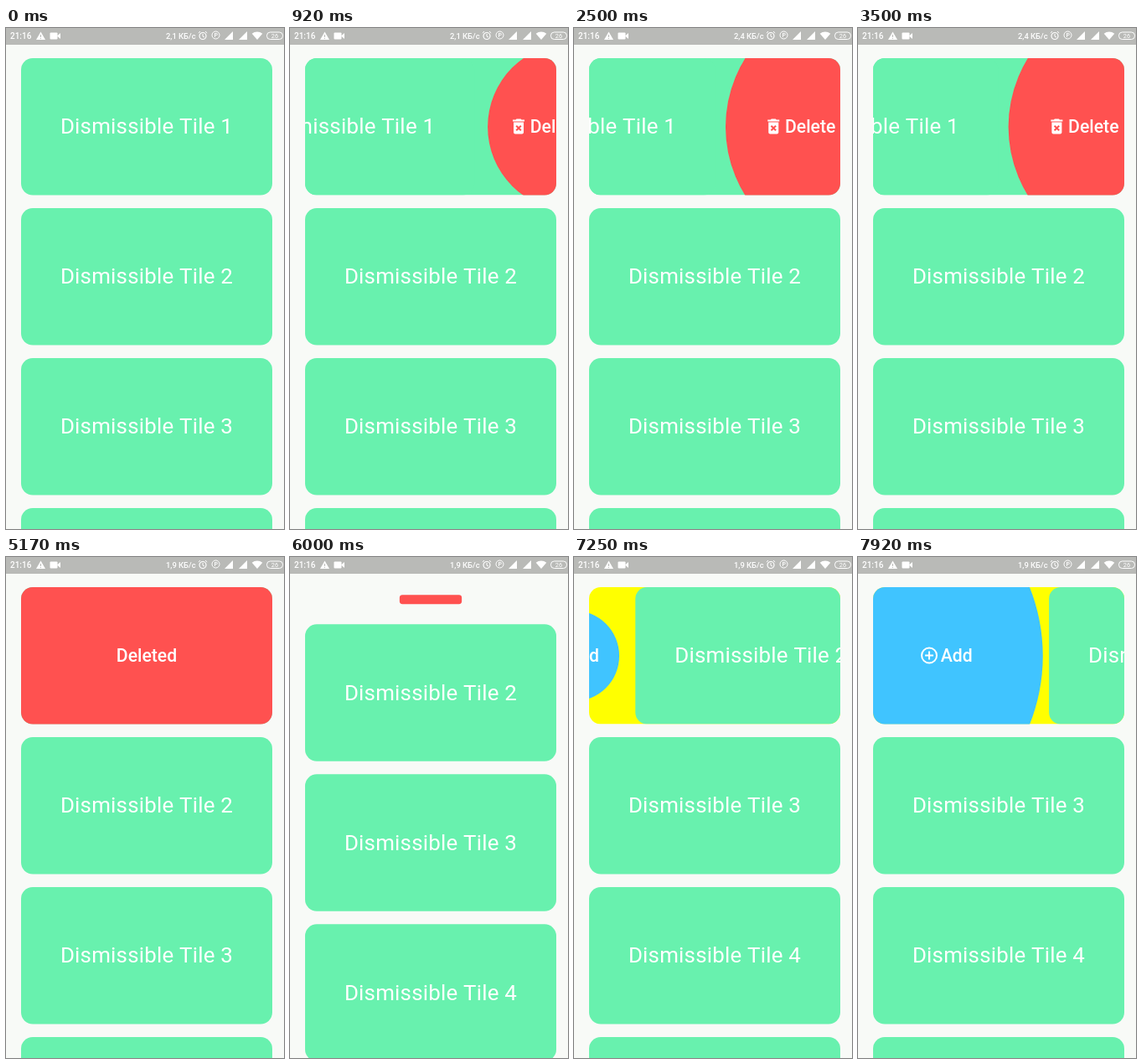
These frames come from a looping animation (332 px wide and 598 px high, 8 s). An HTML page with a canvas:

```html
<!DOCTYPE html>
<html lang="en">
<head>
<meta charset="utf-8">
<title>Dismissible tiles</title>
<style>
  html, body { margin: 0; width: 100%; height: 100%; overflow: hidden; background: #f8faf7; }
  canvas { display: block; }
</style>
</head>
<body>
<canvas id="stage" width="332" height="598"></canvas>
<script>
const ctx = document.getElementById('stage').getContext('2d');
const LOOP = 8000;
const GREEN = '#68f1ae', RED = '#ff5150', BLUE = '#40c4ff', YELLOW = '#ffff00';
const CARD = { x: 18, y: 36, w: 300, h: 163.5, r: 14, pitch: 179 };

// [time, distance] points of the two drags
const dragLeft = [[590, 0], [850, 78], [1100, 148], [1350, 188], [1580, 195], [2250, 177],
  [2600, 138], [2920, 118], [3250, 118], [3500, 150], [3750, 230], [4040, 300]];
const dragRight = [[7090, 0], [7250, 55], [7500, 128], [7750, 188], [7920, 210], [8000, 217]];

const trash = new Path2D('M6 19c0 1.1.9 2 2 2h8c1.1 0 2-.9 2-2V7H6v12zm2.46-7.12l1.41-1.41L12 12.59' +
  'l2.12-2.12 1.41 1.41L13.41 14l2.12 2.12-1.41 1.41L12 15.41l-2.12 2.12-1.41-1.41L10.59 14z' +
  'M15.5 4l-1-1h-5l-1 1H5v2h14V4z');
const plus = new Path2D('M13 7h-2v4H7v2h4v4h2v-4h4v-2h-4zM12 2a10 10 0 1 0 0 20a10 10 0 1 0 0-20z' +
  'm0 18a8 8 0 1 1 0-16a8 8 0 1 1 0 16z');

const clamp = v => Math.max(0, Math.min(1, v));
const progress = (t, start, length) => clamp((t - start) / length);

function follow(points, t) {
  if (t <= points[0][0]) return points[0][1];
  for (let i = 1; i < points.length; i++) {
    const [t0, v0] = points[i - 1], [t1, v1] = points[i];
    if (t <= t1) return v0 + (v1 - v0) * (t - t0) / (t1 - t0);
  }
  return points[points.length - 1][1];
}

function text(str, x, y, size, { weight = 400, align = 'left', color = '#fff', spacing = 0 } = {}) {
  ctx.font = `${weight} ${size}px Roboto, sans-serif`;
  ctx.letterSpacing = spacing + 'px';
  ctx.textAlign = align;
  ctx.fillStyle = color;
  ctx.fillText(str, x, y);
}

function roundRect(x, y, w, h, r, color) {
  ctx.beginPath();
  ctx.roundRect(x, y, w, h, r);
  ctx.fillStyle = color;
  ctx.fill();
}

function disc(x, y, r, color) {
  ctx.beginPath();
  ctx.arc(x, y, r, 0, 7);
  ctx.fillStyle = color;
  ctx.fill();
}

function polygon(...p) {
  ctx.beginPath();
  for (let i = 0; i < p.length; i += 2) ctx.lineTo(p[i], p[i + 1]);
  ctx.closePath();
  ctx.fill();
}

function line(draw, width = 1) {
  ctx.beginPath();
  draw();
  ctx.lineWidth = width;
  ctx.stroke();
}

function tile(n, y, dx = 0) {
  roundRect(CARD.x + dx, y, CARD.w, CARD.h, CARD.r, GREEN);
  text('Dismissible Tile ' + n, 168 + dx, y + 90.4, 25.9, { align: 'center', spacing: 0.21 });
}

function label(icon, word, x, y) {
  ctx.save();
  ctx.translate(x, y + 69.5);
  ctx.fillStyle = '#fff';
  ctx.fill(icon, 'evenodd');
  ctx.restore();
  text(word, x + 25.7, y + 88.6, 21.2, { weight: 500 });
}

// A tile dragged sideways over its action; a disc grows from the uncovered edge.
function swipe(n, y, dx, t) {
  const right = dx > 0, d = Math.abs(dx);
  ctx.save();
  ctx.beginPath();
  ctx.roundRect(CARD.x, y, CARD.w, CARD.h, CARD.r);
  ctx.clip();
  ctx.fillStyle = right ? YELLOW : GREEN;
  ctx.fillRect(CARD.x, y, CARD.w, CARD.h);
  const radius = Math.max(0, 1.077 * d - 5.5 + Math.max(0, d - 285));
  disc(right ? 0 : 336, y + 82, radius, right ? BLUE : RED);
  if (right) {
    label(plus, 'Add', 73 + 0.69 * (d - 210), y);
  } else {
    const done = progress(t, 4330, 500);
    ctx.globalAlpha = 1 - done;
    label(trash, 'Delete', 195 + 0.68 * (195 - d), y);
    ctx.globalAlpha = done;
    text('Deleted', 168, y + 88.6, 21.2, { weight: 500, align: 'center' });
    ctx.globalAlpha = 1;
  }
  tile(n, y, dx);
  ctx.restore();
}

function collapse(s) {
  const h = Math.min(CARD.h, CARD.pitch * s);
  ctx.save();
  ctx.translate(168, 28.5 + CARD.pitch * s / 2);
  ctx.scale(s, s);
  roundRect(-CARD.w / 2, -h / 2, CARD.w, h, CARD.r, RED);
  ctx.globalAlpha = clamp(s * 2 - 1);
  text('Deleted', 0, 7, 21.2, { weight: 500, align: 'center' });
  ctx.restore();
}

function statusBar(t) {
  ctx.fillStyle = '#b9bab7';
  ctx.fillRect(0, 0, 332, 20);
  text('21:16', 5, 13, 10, { weight: 500 });
  ctx.strokeStyle = ctx.fillStyle = '#fff';

  polygon(36, 14, 41.5, 4.5, 47, 14);
  roundRect(52.5, 5.5, 9, 8, 1, '#fff');
  polygon(61, 9.5, 65, 6, 65, 13);
  ctx.fillStyle = '#b9bab7';
  ctx.fillRect(41, 8, 1, 3);
  ctx.fillRect(41, 12, 1, 1);

  const speed = t < 1000 ? '2,1' : t < 4660 ? '2,4' : '1,9';
  text(speed + ' КБ/с', 191, 12.7, 9.4, { weight: 500 });

  line(() => ctx.arc(235, 9.5, 4, 0, 7), 1.2);
  line(() => {
    ctx.moveTo(235, 7); ctx.lineTo(235, 10); ctx.lineTo(237, 11);
    ctx.moveTo(229.8, 6); ctx.lineTo(232, 4);
    ctx.moveTo(240.2, 6); ctx.lineTo(238, 4);
  });
  line(() => ctx.arc(250.5, 8.5, 4.5, 0, 7));
  text('P', 250.7, 11, 7, { weight: 500, align: 'center' });

  for (const x of [261, 278]) polygon(x, 14, x + 10, 4, x + 10, 14);
  ctx.beginPath();
  ctx.moveTo(300, 14);
  ctx.arc(300, 14, 9.5, -Math.PI * 0.73, -Math.PI * 0.27);
  ctx.fill();
  line(() => ctx.roundRect(311.5, 5, 19, 8.5, 4));
  text('26', 321, 12, 7.5, { align: 'center' });
}

function draw(t) {
  ctx.fillStyle = '#f8faf7';
  ctx.fillRect(0, 0, 332, 598);

  const gone = 1 - (1 - progress(t, 5790, 420)) ** 2;
  const dx1 = -follow(dragLeft, t), dx2 = follow(dragRight, t);
  const top = n => CARD.y + CARD.pitch * (n - 1 - gone);

  if (gone > 0 && gone < 1) collapse(1 - gone);
  else if (!gone && dx1) swipe(1, CARD.y, dx1, t);
  else if (!gone) tile(1, CARD.y);

  for (let n = 2; n <= 5; n++) {
    if (n === 2 && dx2) swipe(n, top(n), dx2, t);
    else tile(n, top(n));
  }
  statusBar(t);
}

function frame() {
  draw(performance.now() % LOOP);
  requestAnimationFrame(frame);
}
frame();
</script>
</body>
</html>
```
